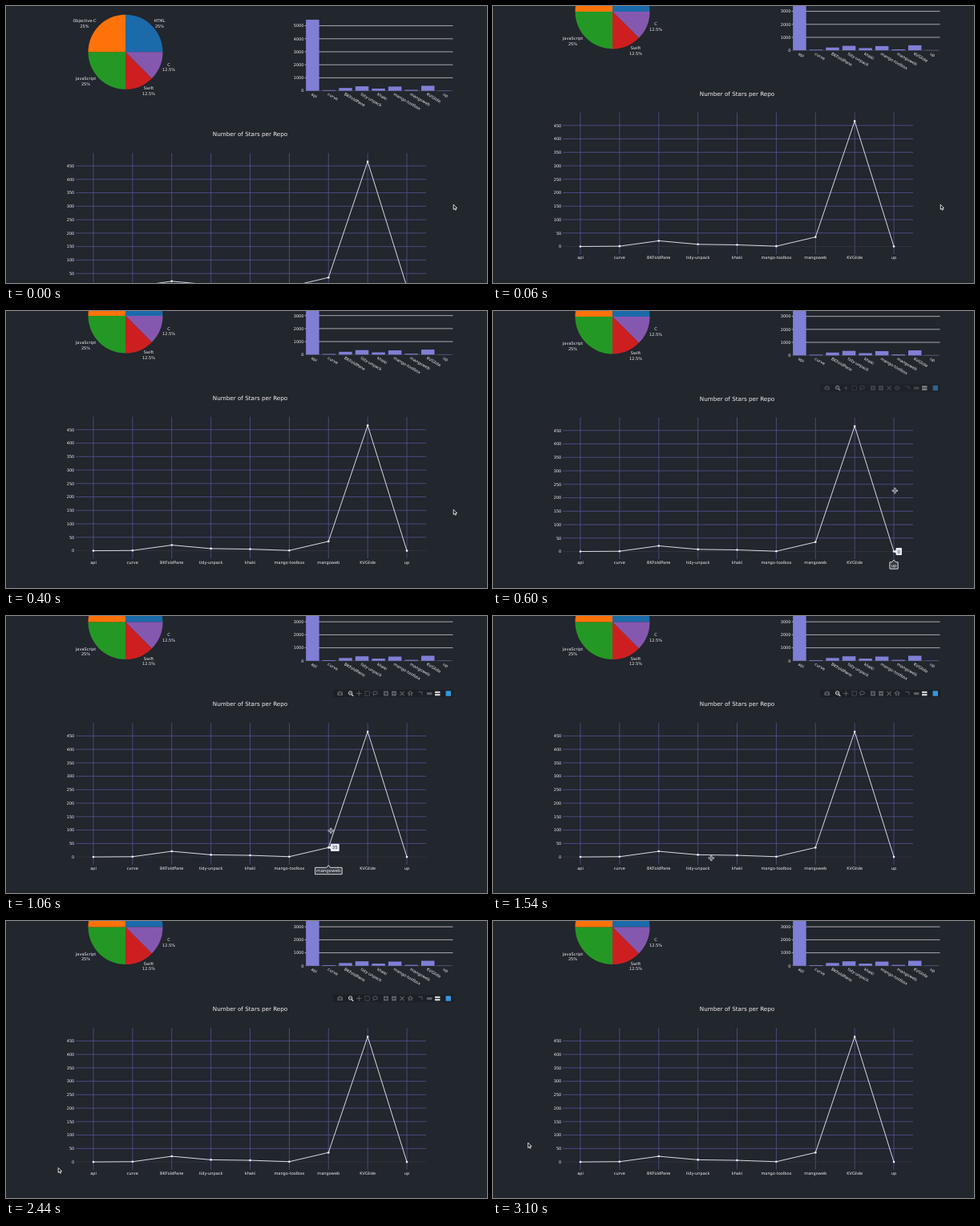
Recreate the animation shown at these times as an HTML page with a canvas. Size 600x345 px, loop 3.14 s.

```html
<!DOCTYPE html>
<html lang="en">
<head>
<meta charset="utf-8">
<title>Repo dashboard</title>
<style>
html, body { margin: 0; width: 100%; height: 100%; overflow: hidden; background: #22262d; }
canvas { display: block; width: 600px; height: 345px; }
</style>
</head>
<body>
<canvas id="stage" width="600" height="345"></canvas>
<script>
const ctx = document.getElementById('stage').getContext('2d');
const LOOP = 3140, STEP = 20;
const BG = '#22262d', INK = '#f0f0f4', GRID = '#555492', BAR = '#807fd6';

const repos = ['api', 'curve', 'BKFoldPane', 'tidy-unpack', 'khaki', 'mango-toolbox', 'mangoweb', 'KVGlide', 'up'];
const stars = [0, 1, 21, 8, 6, 1, 35, 466, 0];
const sizes = [5465, 50, 215, 345, 170, 325, 70, 385, 20];
const slices = [
  // name, share, color, label x, label y
  ['HTML', 25, '#1b6aaa', 191.5, 18.3],
  ['C', 12.5, '#8558b0', 203, 73],
  ['Swift', 12.5, '#ce1f20', 178, 102.6],
  ['JavaScript', 25, '#249824', 99.5, 90.6],
  ['Objective-C', 25, '#ff7209', 98, 18.3]
];

// Keyframes: time, then values
const scrollKeys = [[0, 0], [19, 0], [20, 20], [40, 39], [60, 50.4], [240, 50.4], [400, 51.3], [740, 49.8], [LOOP, 49.8]];
const mouseKeys = [
  [0, 558, 247], [400, 558, 247], [780, 452, 204], [940, 451, 204], [1060, 405.3, 267.5],
  [1540, 272.3, 301.5], [2000, 152, 304], [2440, 65, 307], [2520, 60, 308.5], [2580, 59.5, 308.5],
  [3100, 43.5, 276], [LOOP, 43.5, 276]
];

const clamp01 = v => Math.max(0, Math.min(1, v));
const starX = i => 109 + i * 48.88;
const starY = v => 349.9 - v * 0.335;
const sizeY = v => 105.6 - v * 0.0162;

// Monotone cubic interpolation of column c
function sample(keys, t, c) {
  const slope = i => i < 0 || i >= keys.length - 1 ? 0
    : (keys[i + 1][c] - keys[i][c]) / (keys[i + 1][0] - keys[i][0]);
  const tangent = i => {
    const a = slope(i - 1), b = slope(i);
    return a * b <= 0 ? 0 : 2 * a * b / (a + b);
  };
  let i = 0;
  while (i < keys.length - 2 && t >= keys[i + 1][0]) i++;
  const h = keys[i + 1][0] - keys[i][0], u = (t - keys[i][0]) / h, w = 1 - u;
  return keys[i][c] * (1 + 2 * u) * w * w + tangent(i) * h * u * w * w
    + keys[i + 1][c] * u * u * (3 - 2 * u) - tangent(i + 1) * h * u * u * w;
}

function text(str, x, y, align = 'center', size = 5.04, color = INK) {
  ctx.font = size + 'px "DejaVu Sans", sans-serif';
  ctx.textAlign = align;
  ctx.textBaseline = 'alphabetic';
  ctx.fillStyle = color;
  ctx.fillText(str, x, y + size * 0.36);
}

function path(points, color, width, close) {
  ctx.beginPath();
  points.forEach(([x, y]) => ctx.lineTo(x, y));
  if (close) ctx.closePath();
  ctx.strokeStyle = color;
  ctx.lineWidth = width;
  ctx.stroke();
}

function rect(x, y, w, h, color) {
  ctx.fillStyle = color;
  ctx.fillRect(x, y, w, h);
}

function drawPie() {
  let angle = -Math.PI / 2;
  for (const [name, share, color, x, y] of slices) {
    const end = angle + share / 50 * Math.PI;
    ctx.beginPath();
    ctx.moveTo(149, 57.3);
    ctx.arc(149, 57.3, 46.5, angle, end);
    ctx.fillStyle = color;
    ctx.fill();
    angle = end;
    text(name, x, y);
    text(share + '%', x, y + 6.5);
  }
}

function drawBars() {
  for (let v = 0; v <= 5000; v += 1000) {
    const y = sizeY(v);
    path([[372.5, y], [557.5, y]], v ? '#c9cad0' : '#444750', 0.8);
    text(v, 371.5, y, 'right');
  }
  repos.forEach((name, i) => {
    const mid = 382.4 + i * 20.55, top = sizeY(sizes[i]);
    rect(mid - 8.25, top, 16.5, 105.6 - top, BAR);
    ctx.save();
    ctx.translate(mid - 1.2, 109.3);
    ctx.rotate(Math.PI / 6);
    text(name, 0, 0, 'left');
    ctx.restore();
  });
}

function drawLineChart() {
  text('Number of Stars per Repo', 304.5, 159.5, 'center', 7.2);
  repos.forEach((name, i) => {
    path([[starX(i), 183], [starX(i), 359.5]], GRID, 0.8);
    text(name, starX(i), 364);
  });
  for (let v = 0; v <= 450; v += 50) {
    const y = starY(v);
    path([[87, y], [524, y]], v ? GRID : '#343740', 0.8);
    text(v, 85.3, y, 'right');
  }
  path(stars.map((v, i) => [starX(i), starY(v)]), '#eeeef6', 0.9);
  ctx.fillStyle = '#f2f2ff';
  stars.forEach((v, i) => {
    ctx.beginPath();
    ctx.arc(starX(i), starY(v), 1.3, 0, 7);
    ctx.fill();
  });
}

function box(x, y, w, h, color) {
  ctx.strokeStyle = color;
  ctx.lineWidth = 1;
  ctx.strokeRect(x - w / 2, y - h / 2, w, h);
}

function drawToolbar(opacity) {
  if (!opacity) return;
  const y = 146.3, dim = '#5b5e65', lit = '#cfd0d4';
  const plus = (x, r, color) => {
    path([[x - r, y], [x + r, y]], color, 1);
    path([[x, y - r], [x, y + r]], color, 1);
  };
  const ring = (x, cy, rx, ry, color) => {
    ctx.beginPath();
    ctx.ellipse(x, cy, rx, ry, 0, 0, 7);
    ctx.strokeStyle = color;
    ctx.lineWidth = 1;
    ctx.stroke();
  };
  ctx.globalAlpha = opacity;
  rect(408, y - 4.6, 150, 9, '#1c1f25');
  // camera
  rect(413.5, y - 2, 6.5, 4.5, dim);
  rect(415.3, y - 3, 3, 1, dim);
  ring(416.8, y + 0.2, 1.1, 1.1, '#1c1f25');
  // zoom and pan
  ring(429.6, y - 0.6, 2.2, 2.2, lit);
  path([[431, y + 1], [433.3, y + 3.2]], lit, 1.3);
  path([[428.5, y - 0.6], [430.7, y - 0.6]], lit, 0.8);
  plus(440.3, 3.1, dim);
  // box and lasso select
  ctx.setLineDash([1.3, 0.8]);
  box(450.7, y, 5.5, 5.5, dim);
  ctx.setLineDash([]);
  ring(460.5, y - 0.7, 3, 2, dim);
  path([[458.7, y + 0.8], [458.3, y + 3]], dim, 1);
  // zoom in, zoom out
  for (const x of [474, 484]) {
    rect(x - 3, y - 3, 6, 6, dim);
    path([[x - 1.7, y], [x + 1.7, y]], '#1c1f25', 0.9);
  }
  path([[474, y - 1.7], [474, y + 1.7]], '#1c1f25', 0.9);
  // autoscale and home
  path([[491.5, y - 2.7], [496.7, y + 2.7]], dim, 1.2);
  path([[496.7, y - 2.7], [491.5, y + 2.7]], dim, 1.2);
  path([[500.8, y], [504.2, y - 2.8], [507.6, y]], dim, 1.1);
  rect(502, y - 0.6, 1.6, 3.4, dim);
  rect(504.8, y - 0.6, 1.6, 3.4, dim);
  // spikes and hover modes
  path([[514.5, y - 2], [519, y - 2], [519, y + 2]], dim, 0.9);
  rect(525, y - 1.5, 6.5, 3.2, dim);
  rect(535, y - 2.7, 6.5, 2.3, lit);
  rect(535, y + 0.5, 6.5, 2.3, lit);
  rect(548.6, y - 3.2, 6.4, 6.4, '#3398e0');
  ctx.globalAlpha = 1;
}

function callout(points, fill, border) {
  path(points, border, 0.9, true);
  ctx.fillStyle = fill;
  ctx.fill();
  path(points, border, 0.8, true);
}

function drawHover(mouseX) {
  const i = stars.findIndex((v, k) => Math.abs(mouseX - starX(k)) < 8.4);
  if (i < 0) return;
  const x = starX(i), y = starY(stars[i]);
  ctx.font = '5.5px "DejaVu Sans", sans-serif';
  const valueW = ctx.measureText(stars[i]).width + 2.6;
  const half = ctx.measureText(repos[i]).width / 2 + 1.5;
  const left = x + 3.2, right = left + valueW;
  callout([[x + 0.8, y], [left, y - 2], [left, y - 4], [right, y - 4], [right, y + 4], [left, y + 4], [left, y + 2]],
    '#e6e6f4', '#f4f4ff');
  text(stars[i], left + valueW / 2, y, 'center', 5.5, '#3a3a48');
  callout([[x, 360.3], [x + 2.3, 363.2], [x + half, 363.2], [x + half, 371.4],
    [x - half, 371.4], [x - half, 363.2], [x - 2.3, 363.2]], '#363940', '#d9dade');
  text(repos[i], x, 367.3, 'center', 5.5);
}

function drawCrosshair(x, y) {
  for (const [color, width, r] of [['#d4d5d9', 2.2, 3.6], ['#30333a', 0.7, 3.1]]) {
    path([[x - r, y], [x + r, y]], color, width);
    path([[x, y - r], [x, y + r]], color, width);
  }
}

function drawArrow(x, y) {
  const outline = [[0, 0], [0, 6], [1.4, 4.8], [2.3, 6.8], [3.2, 6.4], [2.4, 4.4], [4.2, 4.3]];
  callout(outline.map(([dx, dy]) => [x + 0.3 + dx, y + 0.3 + dy]), '#0c0d10', '#dcdde0');
}

function draw(t) {
  const scroll = sample(scrollKeys, t, 1);
  const x = sample(mouseKeys, t, 1), y = sample(mouseKeys, t, 2);
  const inPlot = x > 86 && x < 524 && y > 133 && y < 309.5;
  const toolbar = Math.min(clamp01((t - 430) / 300), clamp01((2920 - t) / 300));
  rect(0, 0, 600, 345, BG);
  ctx.save();
  ctx.translate(0, -scroll);
  drawPie();
  drawBars();
  drawLineChart();
  drawToolbar(toolbar);
  if (inPlot) drawHover(x);
  ctx.restore();
  (inPlot ? drawCrosshair : drawArrow)(x, y);
}

const start = performance.now();
function tick() {
  const t = (performance.now() - start) % LOOP;
  draw(Math.floor(t / STEP) * STEP);
  requestAnimationFrame(tick);
}
tick();
</script>
</body>
</html>
```
